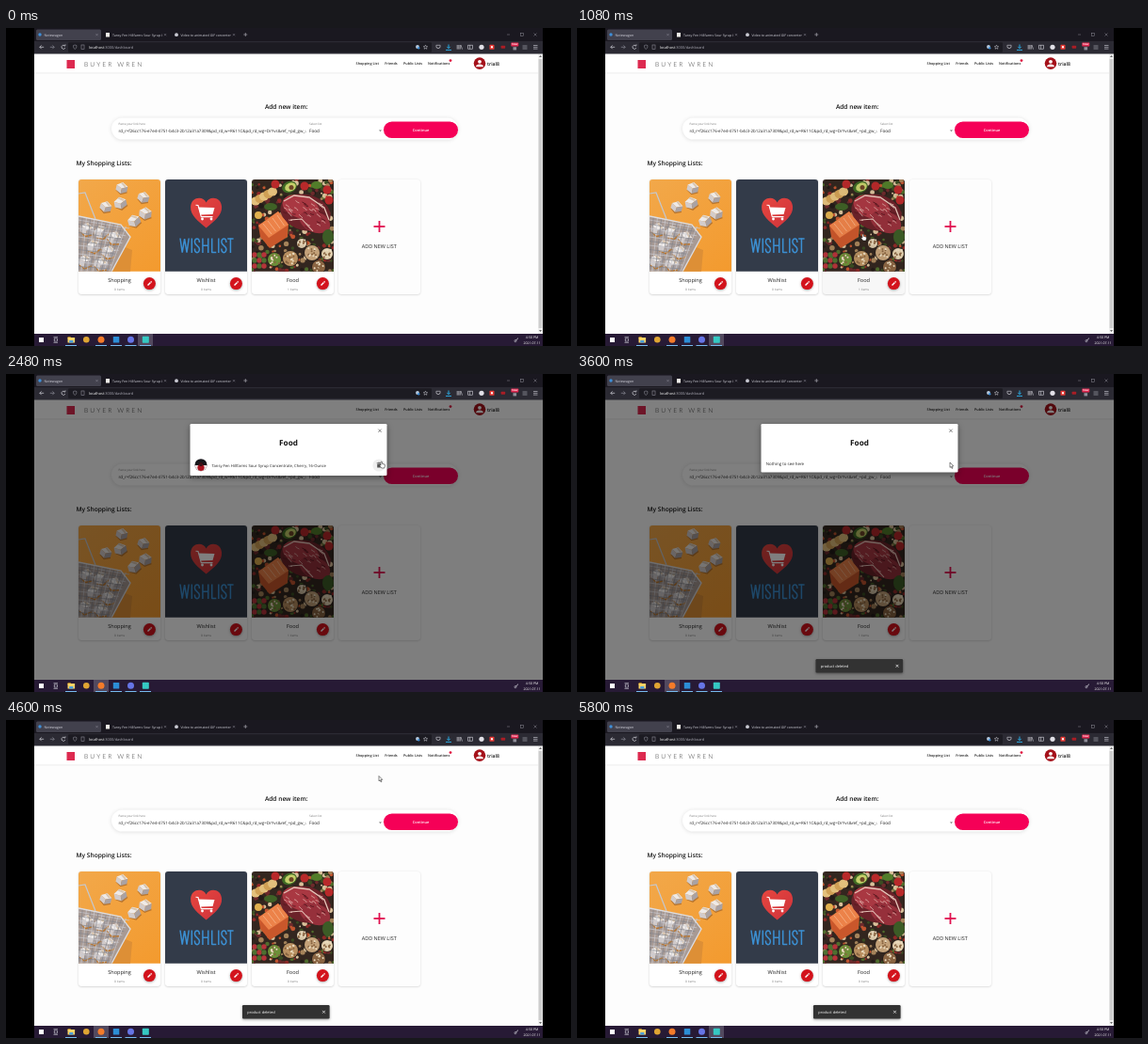
An HTML page with a canvas for the animation above (5840 ms loop, 600 px wide and 338 px high).

```html
<!DOCTYPE html>
<html lang="en">
<head>
<meta charset="utf-8">
<title>Shopping lists</title>
<style>
html, body { margin: 0; width: 100%; height: 100%; overflow: hidden; background: #000; }
canvas { display: block; width: 600px; height: 338px; }
</style>
</head>
<body>
<canvas id="stage"></canvas>
<script>
const LOOP = 5840;
const SANS = '"Open Sans", "Noto Sans", sans-serif';
const PINK = '#f50057', RED = '#d3131c', INK = '#222';
const canvas = document.getElementById('stage');
const dpr = window.devicePixelRatio || 1;
canvas.width = 600 * dpr;
canvas.height = 338 * dpr;
const c = canvas.getContext('2d');
c.textRendering = 'geometricPrecision';

// Pointer stops: time, x, y
const STOPS = [[0, 150, 345], [300, 150, 345], [1000, 303, 219], [1740, 303, 219],
  [2360, 398, 93], [3280, 398, 93], [3480, 396, 94], [3860, 396, 94],
  [4180, 396, 59.5], [4740, 396, 59.5], [5060, 150, 345], [LOOP, 150, 345]];
const CLICK = 1300, LOADED = 1800, DELETED = 3100, CLOSED = 4260;

const clamp = v => Math.max(0, Math.min(1, v));
const ramp = (t, from, len) => clamp((t - from) / len);
const ease = p => p * p * (3 - 2 * p);

function rect(x, y, w, h, color, r = 0) {
  c.fillStyle = color;
  c.beginPath();
  c.roundRect(x, y, w, h, r);
  c.fill();
}
function disc(x, y, r, color, ry = r, turn = 0) {
  c.fillStyle = color;
  c.beginPath();
  c.ellipse(x, y, r, ry, turn, 0, 7);
  c.fill();
}
function trace(pts) {
  c.beginPath();
  for (let i = 0; i < pts.length; i += 2) c.lineTo(pts[i], pts[i + 1]);
}
function poly(pts, color) {
  trace(pts);
  c.fillStyle = color;
  c.fill();
}
function line(pts, color, w = 0.7) {
  trace(pts);
  c.strokeStyle = color;
  c.lineWidth = w;
  c.stroke();
}
function ring(x, y, r, color, w = 0.7, from = 0, to = 7) {
  c.strokeStyle = color;
  c.lineWidth = w;
  c.beginPath();
  c.arc(x, y, r, from, to);
  c.stroke();
}
function text(s, x, y, size, color = INK, weight = 400, align = 'left', family = SANS) {
  c.font = `${weight} ${size}px ${family}`;
  c.fillStyle = color;
  c.textAlign = align;
  c.fillText(s, x, y);
}
function cross(x, y, r, color, w = 0.6) {
  line([x - r, y - r, x + r, y + r], color, w);
  line([x - r, y + r, x + r, y - r], color, w);
}
function clipped(x, y, w, h, r, draw) {
  c.save();
  c.beginPath();
  c.roundRect(x, y, w, h, r);
  c.clip();
  draw();
  c.restore();
}
function shadowed(x, y, w, h, r, color, blur, alpha, dy = 0.6) {
  c.save();
  c.shadowColor = `rgba(0,0,0,${alpha})`;
  c.shadowBlur = blur * dpr;
  c.shadowOffsetY = dy * dpr;
  rect(x, y, w, h, color, r);
  c.restore();
}
function seeded(n) {
  return () => (n = (n * 16807) % 2147483647) / 2147483647;
}

function drawBrowser() {
  const pale = '#d4d4dc', dim = '#8c8b96';
  rect(30, 0, 540, 14, '#1a1820');
  rect(32, 1.5, 69, 11.5, '#42414d', 1.5);
  disc(36, 7, 1.7, '#3f8fd8');
  text('Notewagon', 40.5, 8.5, 3.7, pale);
  rect(106, 5, 4, 4.5, '#f2efe8');
  clipped(113, 2, 53, 11, 0, () => text('Tansy Fen Hillfarms Sour Syrup Co', 113, 8.5, 3.55, pale));
  disc(181, 7.2, 1.9, '#c9c9d2');
  clipped(185, 2, 54, 11, 0, () => text('Video to animated GIF converter', 185.5, 8.5, 3.55, pale));
  for (const x of [96.5, 169, 242]) cross(x, 7.2, 1.1, dim, 0.5);
  line([252.3, 7, 256.3, 7], pale, 0.5);
  line([254.3, 5, 254.3, 9], pale, 0.5);
  line([532, 7, 535, 7], dim, 0.5);
  c.strokeRect(546.5, 5.5, 3, 3);
  cross(562, 7, 1.5, dim, 0.5);

  rect(30, 14, 540, 13.5, '#2b2a33');
  rect(66, 15.2, 386, 10.8, '#1c1b22', 1.2);
  for (const [x, d, col] of [[38, -1, pale], [49, 1, dim]]) {
    line([x - 2.2, 20.3, x + 2.2, 20.3], col);
    line([x + d * 0.3, 18.4, x + d * 2.2, 20.3, x + d * 0.3, 22.2], col);
  }
  ring(61, 20.3, 2, pale, 0.7, 0.4, 5.6);
  line([61.3, 18.9, 63, 18.9, 63, 17.3], pale, 0.6);
  line([71.5, 18.6, 73.2, 18, 75, 18.6, 74.7, 21, 73.2, 22.6, 71.8, 21, 71.5, 18.6], dim, 0.6);
  c.strokeRect(80, 18, 3, 4.5);
  text('localhost', 88, 21.7, 3.9, '#fff');
  const w = c.measureText('localhost').width;
  text(':3000/dashboard', 88 + w, 21.7, 3.9, '#a9a8b3');

  disc(437, 20, 1.9, '#b7cbe0');
  disc(438.2, 21.3, 1.2, '#3f8fd8');
  const star = [];
  for (let i = 0; i <= 10; i++) {
    const r = i % 2 ? 1.1 : 2.3, a = i * Math.PI / 5 - Math.PI / 2;
    star.push(445.5 + r * Math.cos(a), 20.4 + r * Math.sin(a));
  }
  line(star, pale, 0.5);
  ring(459, 19.5, 2.1, pale, 0.7, 0, Math.PI);
  line([456.9, 19.5, 456.9, 18.3, 461.1, 18.3, 461.1, 19.5], pale, 0.6);
  line([470, 17.5, 470, 21.5], '#2bb8f5', 0.9);
  line([468.3, 19.9, 470, 21.6, 471.7, 19.9], '#2bb8f5', 0.9);
  line([467, 23.4, 473, 23.4], '#2bb8f5', 0.9);
  for (const x of [479.2, 480.8, 482.2]) line([x, 18, x, 22.6], pale, 0.7);
  line([483, 18, 484.5, 22.6], pale, 0.6);
  c.strokeRect(490.7, 18.2, 4.6, 4);
  line([492.6, 18.2, 492.6, 22.2], pale, 0.6);
  disc(505, 20.3, 2.6, '#e2e1e8');
  rect(513.5, 17.8, 5, 5, '#e53935', 0.6);
  rect(515, 19.3, 2, 2, '#fff');
  rect(525.6, 18.8, 4.6, 3, '#a91d25', 0.8);
  rect(536.3, 15.4, 8, 4, '#e22850', 0.6);
  text('New', 540.3, 18.4, 2.9, '#fff', 600, 'center');
  rect(538.5, 20.2, 3.6, 3.2, '#8f8e99');
  rect(548.5, 18, 5, 5, '#55555e', 0.6);
  for (const y of [18.5, 20.3, 22.1]) line([560, y, 564.5, y], pale, 0.6);
}

function drawTaskbar(app) {
  rect(30, 325, 540, 13, '#271a35');
  rect(app - 8, 325, 16, 13, '#52495f');
  rect(35, 329, 5, 5, '#fff');
  c.strokeStyle = '#d8d8e0';
  c.lineWidth = 0.6;
  c.strokeRect(51.2, 330, 3.3, 3);
  line([50.5, 328.6, 55, 328.6], '#d8d8e0', 0.6);
  line([50.5, 334.4, 55, 334.4], '#d8d8e0', 0.6);
  rect(65.5, 328.3, 3.4, 2, '#e0a521', 0.4);
  rect(65.5, 329, 7.6, 5.5, '#f8d367', 0.5);
  rect(67.2, 332, 4.2, 2.5, '#4b9fdd');
  disc(85.3, 331.3, 3.3, '#dfa533');
  disc(101, 331.3, 3.5, '#f47b2a');
  rect(113.8, 328, 6.5, 6.5, '#2c8ed6', 0.6);
  disc(132.5, 331.3, 3.5, '#6675e6');
  rect(144.8, 327.8, 7, 7, '#35c9c3', 0.8);
  for (const x of [69, 101, 117, 132.5, 148]) rect(x - 6, 337, 12, 1, '#76b9ed');
  line([540.3, 333.2, 544, 329.6], '#d8d8e0', 0.8);
  ring(541, 332.6, 1.2, '#d8d8e0', 0.4);
  text('4:50 PM', 558.6, 329.9, 3.6, '#fff', 400, 'center');
  text('2021-07-11', 558.6, 336.1, 3.5, '#fff', 400, 'center');
}

function drawHeader() {
  shadowed(30, 27.5, 540, 20.3, 0, '#fff', 1.6, 0.35, 0.5);
  rect(64.5, 34, 8.5, 9, '#dd2a50');
  c.letterSpacing = '2.1px';
  text('BUYER WREN', 83, 40.6, 6.7, '#333', 300, 'left', 'Lato, sans-serif');
  c.letterSpacing = '0px';
  const links = [['Shopping List', 371.6], ['Friends', 402.3], ['Public Lists', 422], ['Notifications', 448]];
  for (const [s, x] of links) text(s, x, 39.2, 3.75, INK, 600);
  disc(472, 34.6, 1.4, '#e01540');
  disc(503, 37.6, 6.3, '#a5121b');
  disc(503, 35.8, 1.9, '#fff');
  clipped(498, 38, 10, 3.2, 0, () => disc(503, 41.2, 3.9, '#fff', 2.8));
  text('trial8', 511, 39.6, 5.1, '#111', 600);
}

function drawForm() {
  text('Add new item:', 297.7, 86, 6.6, '#111', 600, 'center');
  shadowed(112, 95.5, 368, 23, 11.5, '#fff', 4, 0.13);
  text('Paste your link here', 119.5, 102.8, 3.1, '#777');
  clipped(119, 103, 199.5, 13, 0, () => text(
    'rd_r=f26cc176-e7e4-4751-b4c3-2b12a31a7309&pd_rd_w=R611C&pd_rd_wg=DrYvs&ref_=pd_gw_unk',
    119.5, 111.2, 4.45));
  text('Select list', 322, 102.8, 3.1, '#777');
  text('Food', 322, 111.2, 4.7);
  poly([396, 108.4, 399, 108.4, 397.5, 110], '#666');
  rect(401, 99.5, 79, 17.5, PINK, 8.75);
  text('Continue', 440.5, 109.8, 3.95, '#fff', 600, 'center');
}

function cube(x, y, s, turn) {
  c.save();
  c.translate(x, y);
  c.rotate(turn);
  poly([-s, s * 0.6, 0, s * 1.25, s * 1.1, s * 0.7, s * 0.8, 0], '#b9762f');
  poly([-s, -s * 0.4, 0, -s, s, -s * 0.4, 0, s * 0.1], '#eeeae8');
  poly([-s, -s * 0.4, 0, s * 0.1, 0, s, -s, s * 0.5], '#d3cccb');
  poly([s, -s * 0.4, 0, s * 0.1, 0, s, s, s * 0.5], '#aaa2a3');
  poly([-s * 0.3, -s * 0.8, -s * 0.1, -s, s * 0.7, -s * 0.45, s * 0.5, -s * 0.2], '#d8c4ad');
  c.restore();
}

function paintShopping() {
  const g = c.createLinearGradient(77, 161, 164, 259);
  g.addColorStop(0, '#f2a84a');
  g.addColorStop(1, '#f39a2e');
  rect(77, 161, 87, 98, g);
  poly([106, 259, 124, 232, 134, 236, 132, 259], '#dd8f36');
  for (const [x, y, s, a] of [[123, 170, 6, 0.2], [121.5, 186, 6.5, -0.2], [146, 180, 6, 0.3],
    [106, 190, 6, 0.3], [136, 205, 6.5, -0.3], [148, 197, 6.5, 0.1]]) cube(x, y, s, a);
  poly([77, 200, 122, 210, 132, 222, 112, 259, 77, 259], '#a89a94');
  for (const [x, y, s, a] of [[86, 214, 7, 0.2], [101, 217, 7, -0.3], [115, 223, 7, 0.4],
    [93, 232, 7, -0.2], [109, 238, 7, 0.2], [84, 248, 7, 0.1], [101, 251, 7, 0.3]]) cube(x, y, s, a);
  for (let i = 0; i < 13; i++) {
    const col = i % 2 ? '#84868d' : '#cbcbd0';
    line([77 + i * 4.2, 200 + i * 0.9, 74 + i * 3, 259], col, 0.7);
    line([77, 204 + i * 4.5, 131 - i * 1.9, 213 + i * 3.9], col, 0.7);
  }
  line([77, 200, 122, 209, 132, 222, 112, 259], '#dcdce0', 1.3);
  line([77, 176, 84, 175, 95, 203], '#c5c7cd', 1.2);
}

function paintWishlist() {
  rect(169, 161, 87, 98, '#333b49');
  const x = 212.6;
  const g = c.createLinearGradient(196, 181, 229, 213);
  g.addColorStop(0, '#e5463f');
  g.addColorStop(1, '#cf333b');
  c.fillStyle = g;
  c.beginPath();
  c.moveTo(x, 212.5);
  c.bezierCurveTo(x - 9, 205, x - 17, 199, x - 16.5, 190);
  c.bezierCurveTo(x - 16, 179, x - 3, 178, x, 185.5);
  c.bezierCurveTo(x + 3, 178, x + 16, 179, x + 16.5, 190);
  c.bezierCurveTo(x + 17, 199, x + 9, 205, x, 212.5);
  c.fill();
  poly([204.5, 190.5, 221.5, 191, 219.5, 198, 206.5, 198.5], '#fff');
  line([201.5, 188.3, 204, 188.5, 207.3, 200.6, 219.5, 200.6], '#fff', 1.1);
  disc(208.5, 203, 1.4, '#fff');
  disc(218, 203, 1.4, '#fff');
  drawLettering();
}

// Tall narrow lettering that belongs to the picture
function drawLettering() {
  const blue = '#3b8fd2', a = 224, b = 238.6, m = (a + b) / 2, w = 1.5;
  c.lineJoin = 'bevel';
  const stem = x => line([x, a - 0.5, x, b + 0.5], blue, w);
  const ess = x => {
    c.strokeStyle = blue;
    c.lineWidth = w;
    c.beginPath();
    c.moveTo(x + 5, a + 4);
    c.bezierCurveTo(x + 5, a - 1.3, x, a - 1.3, x, a + 3.5);
    c.bezierCurveTo(x, m, x + 5, m, x + 5, b - 3.5);
    c.bezierCurveTo(x + 5, b + 1.3, x, b + 1.3, x, b - 4);
    c.stroke();
  };
  line([185, a - 0.5, 187.2, b, 189.6, a, 192, b, 194.2, a - 0.5], blue, w);
  stem(197.3);
  ess(200.4);
  stem(208.9);
  stem(214.7);
  line([208.9, m, 214.7, m], blue, w);
  line([218.7, a - 0.5, 218.7, b, 223.3, b], blue, w);
  stem(225.8);
  ess(228.9);
  line([235.2, a, 241.6, a], blue, w);
  stem(238.4);
  c.lineJoin = 'miter';
}

function paintFood() {
  const rnd = seeded(77);
  const tones = ['#4f6d2c', '#8f2a28', '#a5835a', '#3a4c22', '#d9c09a', '#6d2a2c', '#231b18', '#c2542f'];
  rect(261, 161, 87, 98, '#33261f');
  for (let i = 0; i < 260; i++) {
    disc(261 + rnd() * 87, 161 + rnd() * 98, 0.8 + rnd() * 2, tones[Math.floor(rnd() * 8)]);
  }
  for (let i = 0; i < 5; i++) disc(265 + i * 4.5, 184 - i * 2.5, 5, i % 2 ? '#d0a055' : '#e3c07c', 4.5);
  disc(268, 199, 4, '#e0b04e');
  disc(301, 169, 8, '#3f6a24', 6, -0.4);
  disc(302, 169, 6, '#c5cf6b', 4.4, -0.4);
  disc(303, 169.5, 2.5, '#6d4526');
  for (const [x, y] of [[286, 166], [317, 168], [343, 183], [341, 172]]) disc(x, y, 4.5, '#b8292a');
  disc(330, 167, 6, '#527d2a', 4);
  disc(281, 190, 7, '#3f6126', 4);
  disc(318, 196, 27, '#6b2229', 19, 0.25);
  disc(313, 190, 20, '#a93842', 12, 0.3);
  disc(328, 206, 17, '#96303b', 11, 0.4);
  for (let i = 0; i < 34; i++) {
    const a = rnd() * 6.3, r = Math.sqrt(rnd());
    const x = 318 + Math.cos(a) * r * 23, y = 197 + Math.sin(a) * r * 15;
    line([x - 2, y - 2 + rnd() * 2, x, y, x + 2, y + rnd() * 3], i % 3 ? '#d8a09b' : '#57171f', 0.9);
  }
  line([295, 184, 306, 178, 322, 180, 338, 191, 343, 204], '#e6c4b8', 1.3);
  line([302, 204, 314, 203, 326, 216], '#e6c4b8', 1.1);
  poly([268, 210, 289, 195, 300, 209, 299, 222, 280, 234, 270, 222], '#c9572b');
  poly([268, 210, 289, 195, 300, 209, 279, 223], '#ec8249');
  for (let i = 0; i < 4; i++) line([273 + i * 5, 208 - i * 3, 282 + i * 4.5, 219 - i * 3], '#f6b48a', 0.8);
  disc(342, 222, 6, '#3c5c26', 8);
  for (const [x, y, r, col] of [[325, 239, 8, '#c3a179'], [341, 240, 6, '#e2cfae'],
    [302, 245, 8, '#b99061'], [332, 254, 7, '#8b6543'], [285, 246, 7, '#6d9038'], [314, 229, 5, '#d8c6a8']]) {
    disc(x, y, r + 0.8, '#2a211c');
    disc(x, y, r, col);
    for (let i = 0; i < 16; i++) {
      disc(x + (rnd() - 0.5) * r * 1.4, y + (rnd() - 0.5) * r * 1.4, 1, i % 2 ? '#86623f' : '#eadcc0');
    }
  }
  for (let i = 0; i < 9; i++) disc(264 + (i % 3) * 5, 241 + Math.floor(i / 3) * 6, 2.7, i % 2 ? '#4d7030' : '#b5343a');
}

function drawCard(x, name, count, paint, hover) {
  shadowed(x, 161, 87, 122, 3, '#fff', 2, 0.22);
  clipped(x, 161, 87, 122, 3, () => {
    clipped(x, 161, 87, 97.7, 0, paint);
    if (hover) rect(x, 161, 87, 122, 'rgba(0,0,0,.03)');
  });
  text(name, x + 43.5, 270.3, 5.6, INK, 400, 'center');
  text(count + ' items', x + 43.5, 278.8, 3.2, '#777', 400, 'center');
}

function drawPencil(x) {
  c.save();
  c.shadowColor = 'rgba(0,0,0,.35)';
  c.shadowBlur = 2.5 * dpr;
  c.shadowOffsetY = 0.8 * dpr;
  disc(x, 271.6, 6.5, RED);
  c.restore();
  line([x - 1.9, 273.5, x + 1.1, 270.5], '#fff', 1.5);
  line([x + 1.5, 270.1, x + 2.2, 269.4], '#fff', 1.5);
}

function drawPage(t) {
  rect(30, 27, 540, 298, '#fdfdfd');
  drawHeader();
  drawForm();
  text('My Shopping Lists:', 74.5, 146, 6.6, '#111', 600);
  drawCard(77, 'Shopping', 0, paintShopping);
  drawCard(169, 'Wishlist', 0, paintWishlist);
  drawCard(261, 'Food', t < CLOSED ? 1 : 0, paintFood, t > 900 && t < LOADED);
  const grow = ease(ramp(t, CLICK, 500)), fade = 1 - ramp(t, 1620, 300);
  if (t > CLICK && fade > 0) {
    clipped(261, 161, 87, 122, 3, () => disc(304, 221, 10 + grow * 56, `rgba(0,0,0,${0.16 * fade})`));
  }
  for (const x of [152.4, 244.4, 336.4]) drawPencil(x);
  shadowed(353, 161, 87, 122, 3, '#fdfdfd', 2, 0.18);
  line([390.5, 211, 402.5, 211], '#e0104f', 1.8);
  line([396.5, 205, 396.5, 217], '#e0104f', 1.8);
  text('ADD NEW LIST', 396.2, 234, 5.5, INK, 400, 'center');
  if (t < CLICK || t > CLOSED + 200) {
    rect(565, 27.5, 5, 297.5, '#f0f0f0');
    rect(565.6, 33, 3.8, 286, '#cdcdcd');
    poly([566, 31, 569, 31, 567.5, 29], '#666');
    poly([566, 321, 569, 321, 567.5, 323], '#666');
  }
}

function drawProduct(t) {
  clipped(200.5, 90.2, 13, 13, 6.5, () => {
    rect(200, 90, 14, 14, '#17161a');
    rect(200, 97, 14, 7, '#eee4e4');
    disc(207, 99.5, 3.6, '#a81420');
    rect(205.5, 94, 3, 4, '#3a1115');
  });
  text('Tansy Fen Hillfarms Sour Syrup Concentrate, Cherry, 16-Ounce', 218.5, 98.6, 4.2);
  if (t > 2280) disc(396, 97, 6.6, '#efefef');
  rect(394.2, 95.6, 3.6, 4, '#555', 0.4);
  rect(393.7, 94.4, 4.6, 0.8, '#555');
  rect(395.2, 93.8, 1.6, 0.7, '#555');
}

function drawModal(t) {
  const alpha = ramp(t, CLICK, 220) * (1 - ramp(t, CLOSED, 200));
  if (!alpha) return;
  c.save();
  c.globalAlpha = alpha;
  rect(30, 27, 540, 298, 'rgba(0,0,0,.5)');
  const filled = t >= LOADED && t < DELETED;
  const h = filled ? 55 : 51.5;
  shadowed(195.5, 53, 209, h, 1.2, '#fff', 6, 0.4, 2);
  cross(397, 60.3, 1.7, '#555', 0.7);
  text('Food', 300, 76, 8.2, '#111', 700, 'center');
  if (t < LOADED) {
    const a = -2.1 + (t - 1560) / 1400 * Math.PI * 2;
    clipped(195.5, 53, 209, h, 1.2, () => ring(206.3, 103.6, 5, '#c2183c', 1, a - 0.3, a + 0.3));
  } else if (filled) drawProduct(t);
  else text('Nothing to see here', 200.7, 96.5, 4.4);
  c.restore();
}

function drawSnackbar(t) {
  const p = ease(ramp(t, DELETED, 220));
  if (!p) return;
  const x = t < CLOSED + 200 ? 253.5 : 251;
  c.save();
  c.globalAlpha = p;
  c.translate(x + 46.3, 310.3);
  c.scale(0.75 + p * 0.25, 0.75 + p * 0.25);
  shadowed(-46.3, -7.2, 92.6, 14.4, 1.1, '#323232', 3, 0.4, 1);
  text('product deleted', -41, 1.3, 3.95, '#fff');
  cross(40.2, 0, 1.4, '#fff', 0.7);
  c.restore();
}

function drawPointer(t) {
  let i = 1;
  while (i < STOPS.length - 1 && STOPS[i][0] < t) i++;
  const [t0, x0, y0] = STOPS[i - 1], [t1, x1, y1] = STOPS[i];
  const p = ease(ramp(t, t0, t1 - t0));
  const hand = (t > 900 && t < CLICK) || (t > 2280 && t < DELETED);
  c.save();
  c.translate(x0 + (x1 - x0) * p, y0 + (y1 - y0) * p);
  c.lineJoin = 'round';
  const shape = hand
    ? [0, 0.4, 0.9, 0, 1.5, 0.7, 1.5, 2.4, 4.2, 3.1, 4.5, 4.6, 3.8, 7, 0.8, 7, -1.4, 4.2, -0.8, 3.5, 0, 4.2, 0, 0.4]
    : [0, 0, 0, 5.4, 1.2, 4.3, 2.1, 6.4, 3, 6, 2.1, 4, 3.8, 3.9, 0, 0];
  poly(shape, '#fff');
  line(shape, '#111', 0.5);
  c.restore();
}

function draw(t) {
  c.setTransform(dpr, 0, 0, dpr, 0, 0);
  rect(0, 0, 600, 338, '#000');
  clipped(30, 27, 540, 298, 0, () => {
    drawPage(t);
    drawModal(t);
    drawSnackbar(t);
  });
  drawBrowser();
  drawTaskbar(t > CLICK && t < 5640 ? 101 : 148);
  drawPointer(t);
}

let start;
function tick(now) {
  start ??= now;
  draw((now - start) % LOOP);
  requestAnimationFrame(tick);
}
draw(0);
requestAnimationFrame(tick);
</script>
</body>
</html>
```
